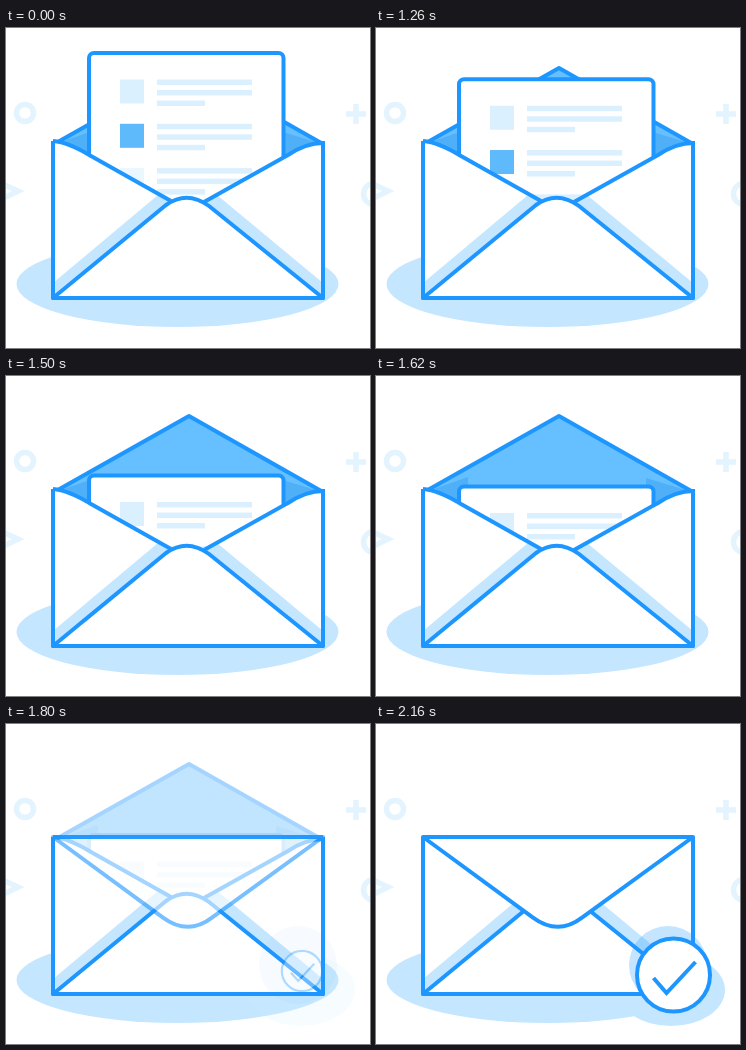
An HTML page that plays this animation: 364 by 320 pixels, repeating every 3060 ms.

```html
<!DOCTYPE html>
<html lang="en">
<head>
<meta charset="utf-8">
<title>Letter sent</title>
<style>
html, body { margin: 0; width: 100%; height: 100%; overflow: hidden; background: #fff; }
svg { display: block; width: 364px; height: 320px; }
.line { fill: none; stroke: #1e96ff; stroke-width: 4; stroke-linejoin: round; }
.paper { fill: #fff; }
.deco { fill: none; stroke: #e3f4ff; stroke-width: 5.5; }
.shade { fill: #c5e6ff; }
</style>
</head>
<body>
<svg viewBox="0 0 364 320">
  <g class="deco">
    <circle cx="19" cy="85" r="8.5"/>
    <path d="M340 86h20M350 76v20M-12 152L12 163L-12 175"/>
    <circle cx="368" cy="166" r="10.5"/>
  </g>

  <ellipse class="shade" cx="171.5" cy="256" rx="161" ry="43"/>
  <ellipse class="shade" id="badgeFloor" cx="295" cy="266" rx="54" ry="36"/>
  <path class="paper" d="M47 113H317V270H47Z"/>

  <g id="inside">
    <path class="line" style="fill:#66bfff" d="M50 115L183 40L317 116Z"/>
    <path fill="#4fb0f8" d="M55 114L92 101V134ZM313 115L270 102V136Z"/>
    <g id="letter">
      <rect class="line paper" style="fill:#fff" x="83" y="25" width="194.5" height="155" rx="5"/>
      <g id="rows"></g>
    </g>
  </g>

  <!-- envelope front -->
  <path class="paper" d="M47 270V113Q62 115 85 128L165 173L160 177ZM317 270V115Q300 115 282 127L198 174L203 178Z"/>
  <path class="shade" d="M47 270V255L152 167L165 173ZM317 270V255L211 167L198 174Z"/>
  <path class="line" d="M47 113Q62 114 85 128L165 173M317 115Q300 115 282 127L198 174"/>
  <path class="line paper" style="fill:#fff" d="M47 270L160 177Q181 162 203 178L317 270Z"/>
  <path class="line" d="M47 113V270H317V113"/>

  <!-- closed flap -->
  <path class="line" id="flap" style="fill:#fff" d="M47 113L157 193.6Q182 212 206 193.6L317 113Z"/>
  <path class="line" id="topEdge" d="M47 113H317"/>

  <circle id="badgeShadow" cx="292" cy="241" r="39" fill="#1e96ff"/>
  <g id="badge">
    <circle class="line" style="fill:#fff" r="36.5"/>
    <path class="line" style="stroke-linejoin:miter" d="M-20 3L-7 18L22 -13"/>
  </g>
</svg>
<script>
const LOOP = 3060, STEP = 60;
const el = id => document.getElementById(id);
const progress = (t, from, to) => Math.min(1, Math.max(0, (t - from) / (to - from)));
const fade = (id, value) => el(id).setAttribute('opacity', value);
const move = (id, value) => el(id).setAttribute('transform', value);

const bar = (x, y, w, h, fill) =>
  `<rect x="${x}" y="${y}" width="${w}" height="${h}" fill="${fill}"/>`;
el('rows').innerHTML = ['#daf0ff', '#5fbafb', '#ebf7ff'].map((fill, i) => {
  const y = 51.5 + 44.3 * i;
  return bar(114, y, 24, 24, fill) +
    [95, 95, 48].map((w, k) => bar(151, y + 10.5 * k, w, 5.5, '#daf0ff')).join('');
}).join('');

function draw(t) {
  const drop = 1 - (1 - progress(t, 1110, 1650) ** 1.4) ** 2;
  move('letter', `translate(0 ${86 * drop})`);

  const close = progress(t, 1620, 1920);
  fade('inside', 1 - close);
  fade('flap', close);
  fade('topEdge', Math.min(1, close * 1.5));

  const pop = progress(t, 1680, 2040);
  move('badge', `translate(${295.3 + 2.2 * pop} ${245 + 6 * pop}) scale(${0.33 + 0.67 * pop})`);
  fade('badge', pop);

  const shadow = progress(t, 1740, 2160);
  fade('badgeFloor', shadow);
  fade('badgeShadow', 0.26 * shadow);
}

const start = performance.now();
function tick() {
  const t = (performance.now() - start) % LOOP;
  draw(Math.floor(t / STEP) * STEP);
  requestAnimationFrame(tick);
}
tick();
</script>
</body>
</html>
```
